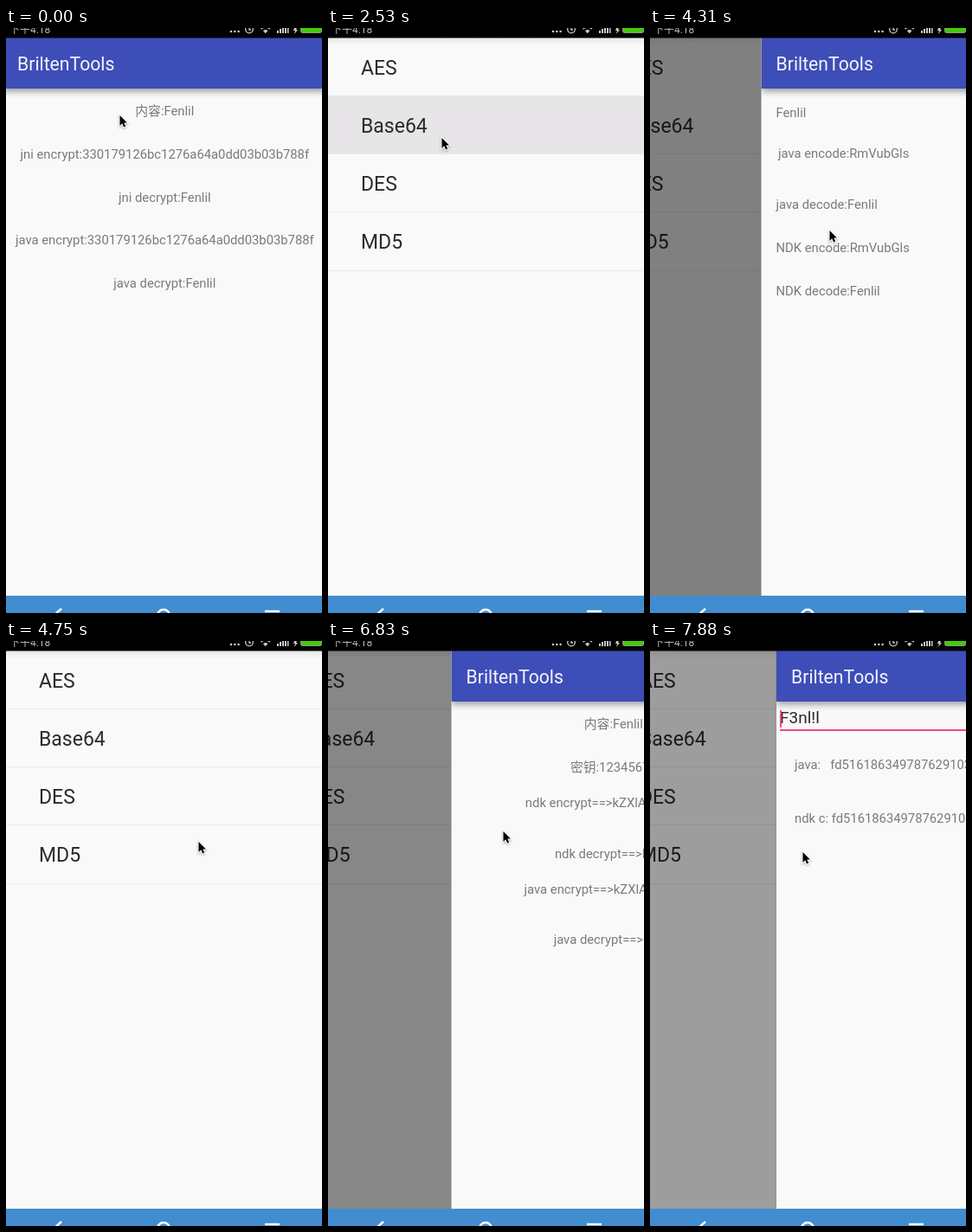
An HTML page that plays this animation: 365 by 676 pixels, repeating every 8000 ms.

```html
<!DOCTYPE html>
<html lang="zh">
<head>
<meta charset="utf-8">
<title>Cipher demo</title>
<style>
html, body { margin: 0; width: 100%; height: 100%; overflow: hidden; background: #000; }
body { font-family: Roboto, "Noto Sans CJK SC", "Noto Sans CJK", sans-serif; }
#stage { position: relative; width: 365px; height: 676px; overflow: hidden; background: #f9f9f9; }
#list, #dim, .page { position: absolute; top: 11px; height: 645px; }
#list { left: 0; width: 480px; background: linear-gradient(#e6e6e6, #f9f9f9 9px); }
#dim { left: 0; width: 365px; background: #000; }
.row { position: absolute; left: 0; width: 100%; height: 67.3px; box-sizing: border-box; border-bottom: 1px solid #e9e9e9;
  padding-left: 38px; line-height: 70px; font-size: 23px; color: #2b2b2b; }
.row.on { background: #e7e5e7; }
.page { left: -4.5px; width: 373px; overflow: hidden; background: #f9f9f9; box-shadow: 0 0 2px rgba(0,0,0,.2); }
.bar { position: absolute; left: 0; top: 0; width: 373px; height: 59px; background: #3e4eb8; box-shadow: 0 3px 8px rgba(0,0,0,.4); }
.bar span { position: absolute; left: 17.5px; top: 16px; line-height: 30px; font-size: 21.2px; color: #f4f5fc; }
.line { position: absolute; line-height: 20px; font-size: 14.8px; color: #7a7a7a; white-space: pre; }
.mid { left: 0; width: 375.6px; text-align: center; }
.field { font-size: 19px; color: #2a2a2a; }
.under { position: absolute; left: 4.5px; top: 91px; width: 369px; height: 2px; background: #f5497f; }
.caret { position: absolute; left: 4.5px; top: 69px; width: 2px; height: 20px; background: #f5497f; }
#chrome, #cursor { position: absolute; left: 0; top: 0; }
#cursor { filter: drop-shadow(0 1px 1px rgba(0,0,0,.3)); overflow: visible; }
</style>
</head>
<body>
<div id="stage">
  <div id="list"></div>
  <div id="dim"></div>
  <svg id="chrome" width="365" height="676">
    <rect width="365" height="11.5" fill="#000"/>
    <text x="4" y="5.500" font-size="12" fill="#bdbdbd">下午4:18</text>
    <g fill="#c9c9c9">
      <circle cx="260" cy="4" r="1.3"/><circle cx="264.3" cy="4" r="1.3"/><circle cx="268.6" cy="4" r="1.3"/>
      <path d="M313 3h2v3h-2zM316 1h2v5h-2zM319 0h2v6h-2zM322 0h2v6h-2zM325 0h1.5v6h-1.5z"/>
      <path d="M333 0h3l-1 2h2l-4 5 1-4h-2z"/>
      <path d="M297 3.2q2.7-2.2 5.4 0l-2.7 3z"/>
    </g>
    <g fill="none" stroke="#c9c9c9" stroke-width="1.3">
      <circle cx="281" cy="1.5" r="4.3"/><path d="M281 0v2h2M294.500 1.200q5.200-4 10.400 0"/>
    </g>
    <rect x="340.5" y="-6" width="24" height="11.5" rx="2" fill="#43c90b" stroke="#8f9a8c"/>
    <rect y="656" width="365" height="20" fill="#428dcf"/>
    <g fill="none" stroke="#fff" stroke-width="2.4">
      <path d="M64 671l-9 8"/><circle cx="182" cy="679" r="7"/><path d="M299 674h17"/>
    </g>
  </svg>
  <svg id="cursor" width="14" height="20">
    <path d="M0 0V14.500L3.300 11.400 5.600 16.600 8.200 15.500 6 10.400H10.300Z" transform="translate(.5 1) scale(.82)"
      fill="#000" stroke="#fff" stroke-width="2.4" paint-order="stroke"/>
  </svg>
</div>
<script>
const LOOP = 8000, STEP = 148.5, WIDTH = 365;
const TITLE = 'BriltenTools', NAME = 'Fenlil';
const HEX = '330179126bc1276a64a0dd03b03b788f';
const HASH = 'fd516186349787629103a7c04be52d18';

const $ = id => document.getElementById(id);
const add = (parent, cls, text = '') => {
  const el = document.createElement('div');
  el.className = cls;
  el.textContent = text;
  return parent.appendChild(el);
};
// y is the middle of the line on the stage; x is omitted for centred lines
const line = (page, text, y, x, cls = '') => {
  const el = add(page, `line ${x === undefined ? 'mid' : cls}`, text);
  el.style.top = y - 21 + 'px';
  if (x !== undefined) el.style.left = x + 4.5 + 'px';
};
const makePage = fill => {
  const page = add($('stage'), 'page');
  const bar = add(page, 'bar');
  bar.appendChild(document.createElement('span')).textContent = TITLE;
  fill(page);
  $('stage').insertBefore(page, $('chrome'));
  return page;
};

const rows = ['AES', 'Base64', 'DES', 'MD5'].map((name, i) => {
  const row = add($('list'), 'row', name);
  row.style.top = i * 67.3 + 0.5 + 'px';
  return row;
});

const aes = makePage(p => {
  line(p, '内容:' + NAME, 95.5);
  ['jni', 'java'].forEach((kind, i) => {
    line(p, `${kind} encrypt:${HEX}`, 145.5 + i * 99.5);
    line(p, `${kind} decrypt:${NAME}`, 195.5 + i * 99.5);
  });
});
const base64 = makePage(p => {
  line(p, NAME, 97.5, 13);
  line(p, 'java encode:RmVubGls', 145, 15.5);
  line(p, 'java decode:' + NAME, 203.5, 13);
  line(p, 'NDK encode:RmVubGls', 253.5, 13);
  line(p, 'NDK decode:' + NAME, 303.5, 13);
});
const des = makePage(p => {
  line(p, '内容:' + NAME, 95.5);
  line(p, '密钥:12345678', 145.5);
  ['ndk', 'java'].forEach((kind, i) => {
    line(p, kind + ' encrypt==>kZXlARHCBK4=', 187 + i * 99.5);
    line(p, `${kind} decrypt==>${NAME}`, 245.5 + i * 99.5);
  });
});
const md5 = makePage(p => {
  line(p, 'F3nl!l', 88.5, 0, 'field');
  add(p, 'under');
  add(p, 'caret');
  line(p, 'java:   ' + HASH, 143, 17);
  line(p, 'ndk c: ' + HASH, 204.5, 17);
});

// Times below are counted in steps
const ENTER = [150, 32.5, 0];
const visits = [
  { page: aes, enter: -3, drag: 11, pull: [20, 200] },
  { page: base64, enter: 18, drag: 29, pull: [132.5, 260, 345] },
  { page: des, enter: 36, drag: 46, pull: [146.5, 270, 345] },
  { page: md5, enter: 53, drag: 99, pull: [] }
];
const presses = [[17, 1], [35, 2], [52, 3]];
const path = [
  [0, 131, 100], [1, 137, 106], [5, 137, 106], [10, 223, 321], [11, 110, 262],
  [12, 180, 240], [13, 187, 236], [14, 165, 190], [15, 131, 126], [20, 131, 126],
  [23, 78, 228], [28, 78, 228], [29, 207, 233], [32, 222, 231], [33, 222, 231],
  [34, 147, 192], [38, 147, 192], [41, 60, 214], [45, 60, 214], [46, 202, 219],
  [49, 214, 222], [50, 214, 222], [51, 176, 243], [54, 176, 243]
];

const cursorAt = n => {
  const i = Math.max(1, path.findIndex(k => k[0] >= n));
  const [t0, x0, y0] = path[i - 1], [t1, x1, y1] = path[i];
  const f = (n - t0) / (t1 - t0);
  return [x0 + (x1 - x0) * f, y0 + (y1 - y0) * f];
};

function draw(n) {
  let shift = 0, dim = 0;
  for (const { page, enter, drag, pull } of visits) {
    const pulled = n >= drag;
    const shown = n >= enter && n < drag + pull.length;
    page.style.display = shown ? '' : 'none';
    if (!shown) continue;
    const x = pulled ? pull[n - drag] : ENTER[n - enter] || 0;
    const cover = 1 - x / WIDTH;
    shift = -(pulled ? 101 : 85) * cover;
    dim = (pulled ? 0.765 : 0.63) * cover;
    page.style.transform = `translateX(${x}px)`;
  }
  $('list').style.transform = `translateX(${shift}px)`;
  $('dim').style.opacity = dim;
  rows.forEach((row, i) => row.classList.toggle('on', presses.some(p => p[0] === n && p[1] === i)));
  const [cx, cy] = cursorAt(n);
  $('cursor').style.transform = `translate(${cx}px, ${cy}px)`;
}

const start = performance.now();
function tick() {
  const t = (performance.now() - start) % LOOP;
  draw(Math.min(53, Math.floor((t + 8) / STEP)));
  requestAnimationFrame(tick);
}
tick();
</script>
</body>
</html>
```
